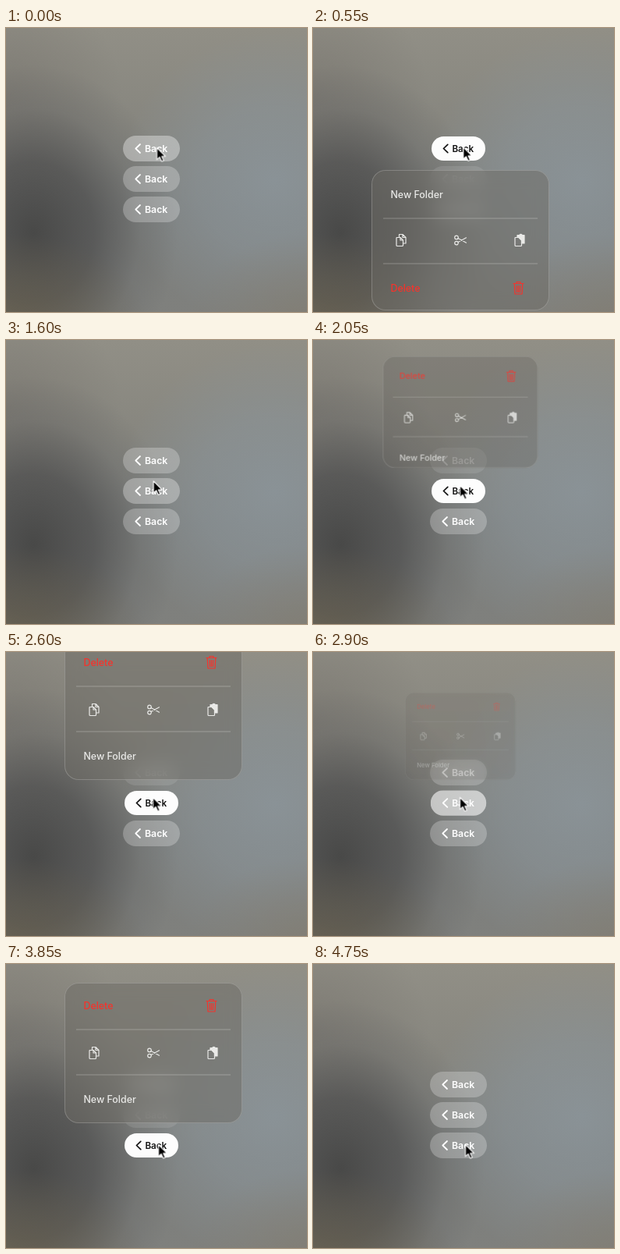
An HTML page for the animation above (4850 ms loop, 386 by 364 pixels).

```html
<!DOCTYPE html>
<html lang="en">
<head>
<meta charset="utf-8">
<title>Back menus</title>
<style>
html, body { margin: 0; width: 100%; height: 100%; overflow: hidden; }
#stage {
  position: relative; width: 386px; height: 364px; overflow: hidden;
  font-family: Inter, "Liberation Sans", sans-serif;
  background:
    radial-gradient(ellipse 170px 110px at 10px 374px, rgba(104,94,72,.6), rgba(104,94,72,0)),
    radial-gradient(ellipse 150px 110px at 386px 374px, rgba(130,124,112,.7), rgba(130,124,112,0)),
    radial-gradient(ellipse 185px 215px at 35px 262px, rgba(70,70,69,.95), rgba(76,76,76,.72) 42%, rgba(96,97,97,.3) 74%, rgba(110,110,110,0)),
    radial-gradient(ellipse 200px 190px at 345px 195px, rgba(139,148,153,.9), rgba(139,148,153,.6) 50%, rgba(139,148,153,0)),
    radial-gradient(ellipse 150px 150px at 0 90px, rgba(112,108,102,.5), rgba(112,108,102,0)),
    linear-gradient(#918f86, #87867f 33%, #7c7e7c 65%, #7f807d);
}
.back {
  position: absolute; left: 150px; width: 73px; height: 33px; border-radius: 17px;
  color: #fff; background: rgba(255,255,255,.25);
}
.back svg { position: absolute; left: 0; top: 0; }
.back text { font-size: 12.3px; font-weight: 600; fill: currentColor; }
.back path { fill: none; stroke: currentColor; stroke-width: 1.8; stroke-linecap: round; stroke-linejoin: round; }
.menu {
  position: absolute; left: 75px; width: 228px; height: 180px; border-radius: 18px;
  overflow: hidden; opacity: 0;
  background: rgba(108,106,100,.5);
  box-shadow: inset 0 0 0 1px rgba(255,255,255,.2);
}
.menu svg { position: absolute; left: 0; }
.menu text { font-size: 12.4px; font-weight: 500; }
.icon { fill: none; stroke: #e9e9e7; stroke-width: 1.2; stroke-linecap: round; stroke-linejoin: round; }
.icon .solid { fill: #e9e9e7; }
.icon.red { stroke: #f5332c; }
#cursor { position: absolute; left: 0; top: 0; }
</style>
</head>
<body>
<div id="stage"></div>
<script>
const LOOP = 4850;
const stage = document.getElementById('stage');

function add(html) {
  stage.insertAdjacentHTML('beforeend', html);
  return stage.lastElementChild;
}

// rows: [time in ms, value]; the ends of the loop hold the nearest value
function play(el, prop, rows, map = v => v, easing = 'linear') {
  const all = [[0, rows[0][1]], ...rows, [LOOP, rows[rows.length - 1][1]]];
  el.animate(
    all.map(([t, v]) => ({ offset: t / LOOP, [prop]: map(v), easing })),
    { duration: LOOP, iterations: Infinity }
  );
}

const shift = (start, rows) => rows.map(([t, v]) => [start + t, v]);
const scale = v => `scale(${v})`;
const px = v => v + 'px';

const menus = [
  { open: 200, close: 850, top: 182, down: true },
  { open: 1950, close: 2650, top: -16 },
  { open: 3600, close: 4150, top: 24 }
];

const buttons = [
  { top: 137.5, hover: [[0, .36]], leave: [[1300, .4], [1500, .25]], under: [1, 2] },
  { top: 176.5, hover: [[1500, .25], [1700, .36]], leave: [[3100, .4], [3250, .25]], under: [0, 2] },
  { top: 215.5, hover: [[3150, .25], [3350, .4]], leave: [[4550, .35], [4650, .33], [4740, .25]], under: [0] }
];

buttons.forEach((b, i) => {
  const el = add(`<div class="back" style="top:${b.top}px"><svg width="73" height="33">
    <path d="M22 11 L16.3 16.5 L22 22"/><text x="28" y="21">Back</text></svg></div>`);
  const { open, close } = menus[i];
  const glow = [...b.hover, [open, b.hover[b.hover.length - 1][1]], [open + 90, .98],
    [close, .98], [close + 300, .5], ...b.leave];
  play(el, 'backgroundColor', glow, a => `rgba(255,255,255,${a})`);
  play(el, 'color', [[open, '#fff'], [open + 90, '#111'], [close, '#111'], [close + 220, '#fff']]);
  play(el, 'transform', [[open, 1], [open + 90, .945], [close, .945], [close + 400, 1]], scale);
  play(el, 'opacity', b.under.flatMap(m => [
    [menus[m].open, 1], [menus[m].open + 100, .42],
    [menus[m].close, .42], [menus[m].close + 380, 1]
  ]));
});

function menuArt(down) {
  const y = v => down ? 180 - v : v;
  const line = v => `<path d="M15 ${y(v)}H213" stroke="#fff" stroke-opacity=".27"/>`;
  const label = (v, text, fill) => `<text x="24.5" y="${y(v) + 4.5}" fill="${fill}">${text}</text>`;
  const icon = (x, v, body, cls = '') =>
    `<g class="icon ${cls}" transform="translate(${x} ${y(v)})">${body}</g>`;
  const front = '<path d="M-5.5 -3.5H-1L2.5 0V6.5Q2.5 7.5 1.5 7.5H-5Q-6 7.5 -6 6.5V-3Z"/>';
  return `<svg width="228" height="180" style="${down ? 'bottom' : 'top'}:0">
    ${line(60)}${line(118)}
    ${label(29, 'Delete', '#f5332c')}${label(149, 'New Folder', '#e9e9e7')}
    ${icon(188.5, 29, `<path d="M-6.5 -5.5H6.5M-2.5 -5.5V-7.5H2.5V-5.5M-5.3 -5.5L-4.5 8H4.5L5.3 -5.5M-2.2 -2.5L-1.9 5.5M0 -2.5V5.5M2.2 -2.5L1.9 5.5"/>`, 'red')}
    ${icon(38, 90, front + '<path d="M-2.5 -3.5V-7.5H2L6 -3.5V4H2.5M2 -7.5V-3.5H6M-1 -3.5V0H2.5"/>')}
    ${icon(114, 90, '<circle cx="-5" cy="-3.6" r="2.3"/><circle cx="-5" cy="3.6" r="2.3"/><path d="M-3 -2.5L7.5 3.2M-3 2.5L7.5 -3.2"/>')}
    ${icon(190, 90, '<path class="solid" d="M-3 -3.5V-6.5H-.5Q1.5 -9 3.5 -6.5H6V4H2.5V0L-1 -3.5Z"/>' + front)}
  </svg>`;
}

menus.forEach(({ open, close, top, down }) => {
  const edge = down ? `top:${top}px;transform-origin:top` : `bottom:${364 - top - 180}px;transform-origin:bottom`;
  const el = add(`<div class="menu" style="${edge}">${menuArt(down)}</div>`);
  const run = (prop, opening, closing, map) =>
    play(el, prop, [...shift(open, opening), ...shift(close, closing)], map);
  run('transform',
    [[0, .4], [50, .68], [100, .872], [150, .975], [190, 1.01], [250, 1]],
    [[0, 1], [400, .4]], scale);
  run('height', [[0, 80], [50, 125], [100, 164], [150, 179], [200, 180]], [[0, 180]], px);
  run('opacity', [[0, 0], [50, .45], [100, .8], [160, 1]], [[0, 1], [200, .5], [300, .18], [400, 0]]);
  run('backdropFilter', [[0, 0], [100, .5], [200, 10]], [[0, 10], [400, 2]], v => `blur(${v}px)`);
});

const cursor = add(`<svg id="cursor" width="16" height="22" viewBox="-1 -1 16 22">
  <path d="M0 0V15.2L3.6 11.9L6.2 17.6L8.7 16.5L6.2 11H11Z" fill="#000" stroke="#fff" stroke-width="1.1" stroke-linejoin="round"/></svg>`);
play(cursor, 'transform', [
  [0, [193.5, 153.5]], [800, [192.5, 152.5]], [1350, [192.5, 152.5]], [1700, [188.5, 186.5]],
  [3030, [188.5, 186.5]], [3350, [195.5, 231.5]]
], ([x, y]) => `translate(${x - 1}px, ${y - 1}px)`, 'ease-in-out');
</script>
</body>
</html>
```
